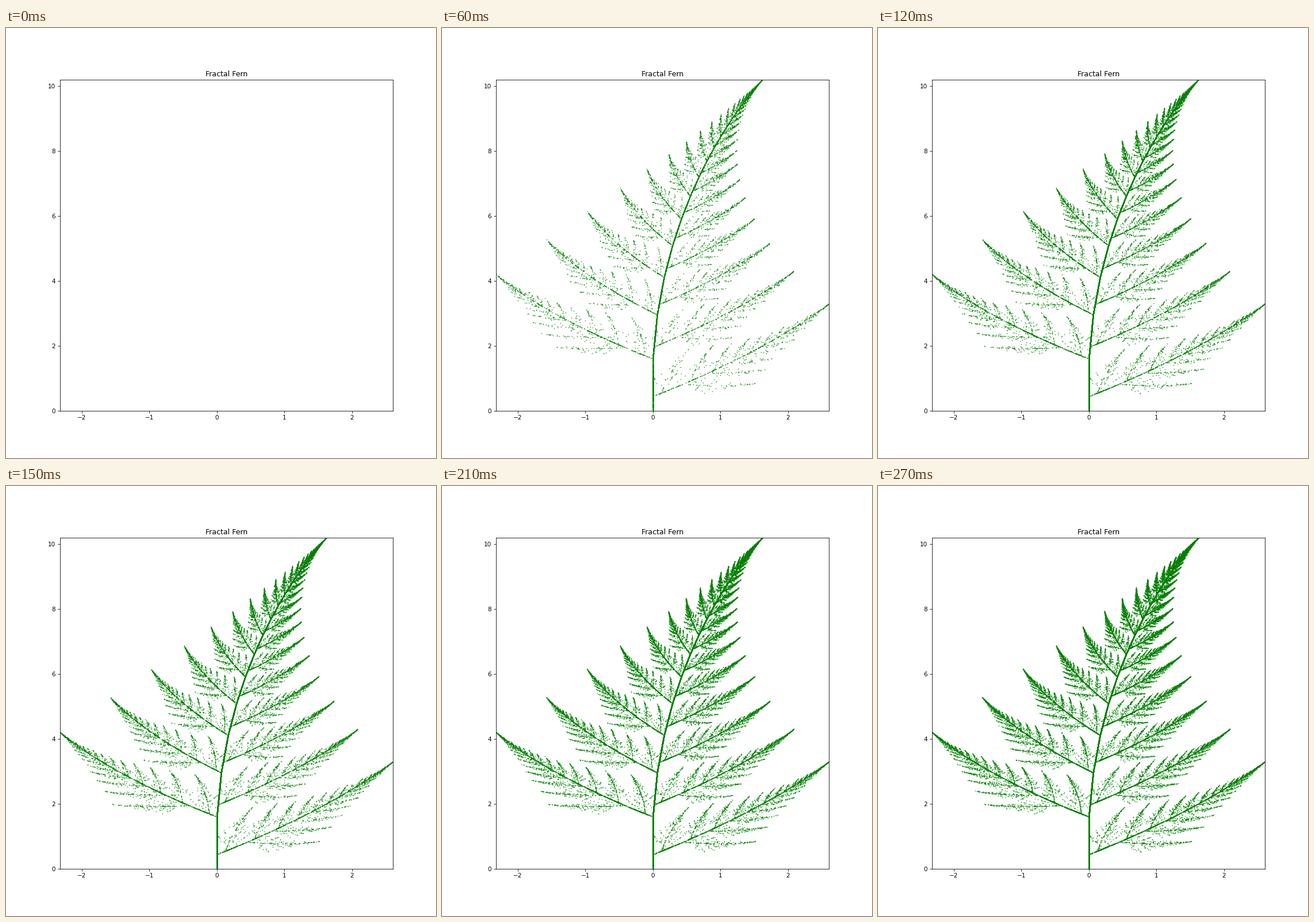
A matplotlib script for the animation above (0.3 s loop, 748x748 px).

```python
import random

import matplotlib.pyplot as plt
import numpy as np
from matplotlib.animation import FuncAnimation

FRAMES = 10
STEP = 6000  # points added per frame

# Affine maps (a, b, c, d, shift): x' = a x + b y, y' = c x + d y + shift
MAPS = [
    (0.75, 0.04, -0.04, 0.85, 1.6),   # rest of the frond
    (0.20, -0.26, 0.23, 0.22, 1.6),   # left leaf
    (-0.15, 0.28, 0.26, 0.24, 0.44),  # right leaf
    (0.0, 0.0, 0.0, 0.16, 0.0),       # stem
]
WEIGHTS = [0.79, 0.07, 0.07, 0.07]


def grow_fern(count):
    rng = random.Random(7)
    points = np.empty((count, 2))
    x = y = 0.0
    for i, (a, b, c, d, shift) in enumerate(rng.choices(MAPS, WEIGHTS, k=count)):
        x, y = a * x + b * y, c * x + d * y + shift
        points[i] = x, y
    return points


fern = grow_fern((FRAMES - 1) * STEP)

fig, ax = plt.subplots(figsize=(10, 10), dpi=74.8)
ax.set_title("Fractal Fern")
ax.set_xlim(-2.326, 2.61)
ax.set_ylim(0, 10.2)
dots, = ax.plot([], [], ".", color="green", markersize=1)


def draw(frame):
    dots.set_data(*fern[:frame * STEP].T)
    return dots,


anim = FuncAnimation(fig, draw, frames=FRAMES, interval=30, repeat=True)
plt.show()
```
